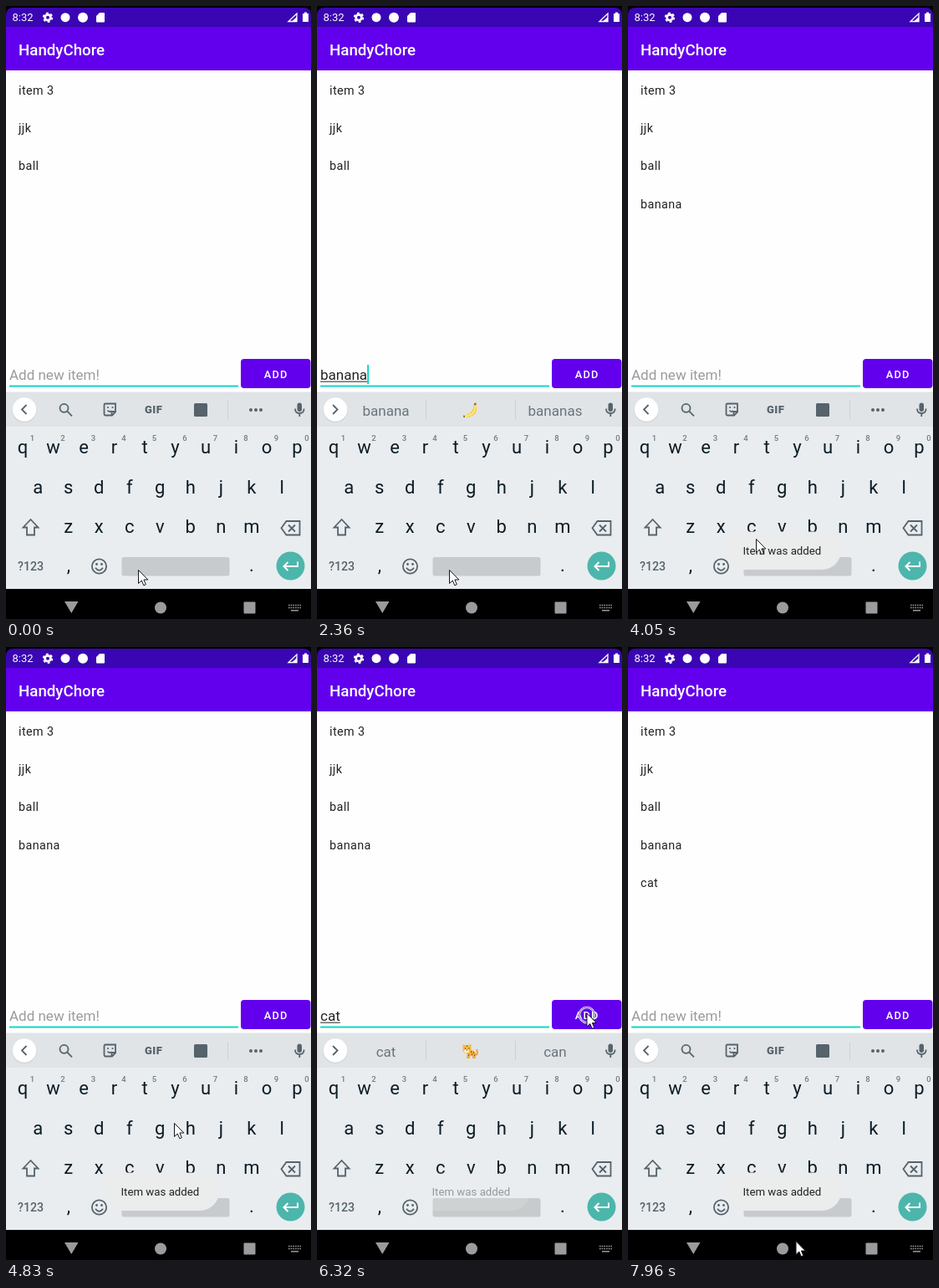
Animation, 365 px wide and 733 px high, one loop 8000 ms. Source, as an HTML page:

```html
<!DOCTYPE html>
<html lang="en">
<head>
<meta charset="utf-8">
<title>HandyChore</title>
<style>
  html, body { margin: 0; height: 100%; overflow: hidden; background: #000; }
  svg { display: block; width: 100vw; height: 100vh; font-family: Roboto, sans-serif; }
  .line { fill: none; stroke: #56636b; stroke-width: 1.8; }
  .icon { fill: #56636b; }
  .mid { text-anchor: middle; }
  #list { font-size: 14.3px; letter-spacing: .42px; fill: #222; }
  #keys { font-size: 22px; fill: #0c1c25; }
  #digits { font-size: 9.5px; font-weight: 500; fill: #727c82; }
  #suggestions { font-size: 17px; fill: #69757c; }
</style>
</head>
<body>
<svg viewBox="0 0 365 733">
  <rect width="365" height="733"/>
  <path d="M0 26V11Q0 2 9 2H356Q365 2 365 11V26Z" fill="#3a05b3"/>
  <rect y="25" width="365" height="52.5" fill="#6200ee"/>
  <rect y="77" width="365" height="385" fill="#fefefe"/>

  <g fill="#fff">
    <text x="7.5" y="18.3" font-size="13">8:32</text>
    <circle cx="50" cy="13.7" r="3.4" fill="none" stroke="#fff" stroke-width="2.8"/>
    <circle cx="50" cy="13.7" r="5.3" fill="none" stroke="#fff" stroke-width="1.8" stroke-dasharray="2.8 2.75"/>
    <circle cx="71" cy="13.7" r="5.5"/>
    <circle cx="92" cy="13.7" r="6"/>
    <path d="M112 8h5q1 0 1 1v9.500q0 1-1 1h-8q-1 0-1-1V12Z"/>
    <path d="M348 9V18.500H338Z" fill="none" stroke="#fff" stroke-width="1.3"/>
    <path d="M348 13V18.500H342Z"/>
    <path d="M357 7.500h3v1.500h2v10h-7v-10h2z"/>
    <text x="15" y="58.500" font-size="18.7" font-weight="500">HandyChore</text>
  </g>

  <g id="list"></g>

  <text id="hint" x="4" y="447" font-size="17" fill="#9b9b9b">Add new item!</text>
  <text id="typed" x="4" y="447" font-size="17" fill="#212121"></text>
  <rect id="underline" x="4" y="448.600" height="1" fill="#212121"/>
  <rect x="4" y="453.500" width="274" height="2" fill="#12d6c9"/>
  <rect id="caret" y="429" width="2" height="23" fill="#12d6c9"/>
  <rect id="button" x="281" y="422" width="83.500" height="35" rx="4"/>
  <text x="308.800" y="444.600" font-size="12.8" font-weight="500" letter-spacing="1.2" fill="#fff">ADD</text>

  <rect y="461.500" width="365" height="42" fill="#e0e4e7"/>
  <rect y="503" width="365" height="194" fill="#e9edf0"/>
  <circle cx="22" cy="483.200" r="14.8" fill="#cfd3d6"/>
  <circle cx="22" cy="482.500" r="14.3" fill="#fff"/>
  <path id="chevron" class="line" stroke-width="2"/>

  <g id="toolbar">
    <circle class="line" cx="69.500" cy="480.800" r="5"/>
    <path class="line" d="M73.300 484.600L79 490.300"/>
    <path class="line" d="M119 475.500H131V485.500L127 489.500H119Q117.500 489.500 117.500 488V477Q117.500 475.500 119 475.500ZM126.500 489V485H131M121.500 483.500Q124 486.500 126 484" stroke-width="1.6"/>
    <circle class="icon" cx="122" cy="480" r="1.100"/><circle class="icon" cx="127.500" cy="480" r="1.100"/>
    <text x="166" y="487" font-size="13" font-weight="900" letter-spacing=".5" class="icon">GIF</text>
    <rect class="icon" x="225" y="475" width="16" height="16" rx="1.500"/>
    <path d="M265.500 472V494" stroke="#cdd2d5"/>
    <circle class="icon" cx="293" cy="483" r="2"/><circle class="icon" cx="299" cy="483" r="2"/><circle class="icon" cx="305" cy="483" r="2"/>
  </g>
  <g id="suggestions" class="mid">
    <path d="M130.500 471V494M237.500 471V494" stroke="#c9ced1"/>
    <text x="82.500" y="489.500"></text>
    <text x="184" y="489.500" font-weight="700" fill="#111"></text>
    <text x="285" y="489.500"></text>
    <g id="fruit">
      <path d="M188 475L190.500 474.500L190.300 478C194 486 186 493 175.500 492L175 489.500C182 489 187 485 187.500 478Z" fill="#f8cf3d"/>
      <path d="M189 478C190.500 485 185 490 176 491" fill="none" stroke="#fff0a0" stroke-width="1.4"/>
      <path d="M188 475L190.500 474.500V477L188 477.500ZM175 489.500L177 490V492L175.500 492Z" fill="#8a7430"/>
    </g>
    <g id="feline">
      <path d="M188 488Q194 488 191 481" fill="none" stroke="#eda536" stroke-width="2"/>
      <path d="M180 482Q189 481 190 487V492H186V489H183V492H179Z" fill="#f2ae3b"/>
      <path d="M174.500 475L177 476H182L184.500 474.500V482Q183 486 179.500 486Q175 485.500 174.500 482Z" fill="#f7b947"/>
      <ellipse cx="179" cy="483" rx="3" ry="2" fill="#fff0d2"/>
      <path d="M177 480h1M181.500 480h1M179 482h1M184 484h1M187 485h1M185 487h1M188 488h1M181 488h1M179 477h1" stroke="#714718" stroke-width="1.400"/>
    </g>
  </g>
  <rect class="icon" x="348.500" y="474.500" width="5.500" height="10.500" rx="2.750"/>
  <path class="line" d="M346 481.500Q346 487 351.300 487T356.600 481.500M351.300 487V491"/>

  <g id="keys" class="mid"></g>
  <g id="digits" class="mid"></g>
  <path class="line" d="M29.500 614L20.500 623.500H25V632.500H34V623.500H38.500Z"/>
  <path class="line" d="M335.500 616H351.500V632.500H335.500L329.500 624.200ZM338 620.500L346 628.500M346 620.500L338 628.500"/>
  <text x="14" y="675" font-size="14.200" font-weight="500" class="icon">?123</text>
  <circle class="line" cx="111.500" cy="670" r="8.600"/>
  <circle class="icon" cx="108.500" cy="667.500" r="1.400"/><circle class="icon" cx="114.500" cy="667.500" r="1.400"/>
  <path class="line" d="M107 671.800Q111.500 678 116 671.800"/>
  <rect x="138.500" y="659" width="129" height="22.500" rx="2.500" fill="#c8cbcd"/>
  <circle cx="340.500" cy="669.500" r="17" fill="#4db6ac"/>
  <path d="M349 664.500V670H333M337.500 665L332.500 670L337.500 675" fill="none" stroke="#fff" stroke-width="2"/>

  <rect y="697" width="365" height="36"/>
  <g fill="#9b9b9d">
    <path d="M70 712H86.500L78.250 726Z"/>
    <circle cx="185" cy="719.500" r="7"/>
    <rect x="284.500" y="712.500" width="14" height="14" rx="1"/>
    <path d="M338 716.500H353M338 719.500H353" stroke="#9b9b9d" stroke-width="1.600" stroke-dasharray="1.600 1.100"/>
    <path d="M341 722.800H350" stroke="#9b9b9d" stroke-width="1.500"/>
  </g>

  <g id="toast">
    <rect id="pill" x="116" y="628.500" width="139" height="45.500" rx="22.700" fill="#ebecec"/>
    <text id="message" x="137.500" y="656" font-size="13.250" fill="#222">Item was added</text>
  </g>
  <g id="ring" fill="none">
    <circle cx="323" cy="440" r="9" stroke="#fff" stroke-width="2.500"/>
    <circle cx="323" cy="440" r="9" stroke="#57519a"/>
  </g>
  <path id="pointer" d="M0 0V16L3.800 12.500L6.300 18.300L8.800 17.200L6.400 11.500H11.300Z" fill="#fff" stroke="#16161e" stroke-linejoin="round"/>
</svg>
<script>
const LOOP = 8000;
const $ = id => document.getElementById(id);
const label = (x, y, s) => `<text x="${x}" y="${y}">${s}</text>`;
const show = (id, on) => $(id).setAttribute('visibility', on ? 'inherit' : 'hidden');
const set = (id, attributes) => {
  for (const name in attributes) $(id).setAttribute(name, attributes[name]);
};

const items = ['item 3', 'jjk', 'ball', 'banana', 'cat'];
$('list').innerHTML = items.map((s, i) => label(15, 106 + i * 45.2, s)).join('');
const keyRow = (chars, x, y) =>
  [...chars].map((c, i) => label(x + i * 36.5, y, c)).join('');
$('keys').innerHTML = keyRow('qwertyuiop', 20, 535) + keyRow('asdfghjkl', 38.3, 582.5) +
  keyRow('zxcvbnm', 74.8, 630) + keyRow(',', 75, 676) + keyRow('.', 294, 676);
$('digits').innerHTML = keyRow('1234567890', 31.5, 520);

// Each entry: start time, typed text, then the three suggestions.
const typing = [
  [0, ''],
  [710, 'b', 'b', 'be', 'but'],
  [850, 'ba', 'ba', 'back', 'bad'],
  [970, 'ban', 'ban', 'band', 'bank'],
  [1100, 'bana', 'bana', 'banana', 'bananas'],
  [1230, 'banan', 'banan', 'banana', 'bananas'],
  [1370, 'banana', 'banana', 'fruit', 'bananas'],
  [3360, ''],
  [5270, 'c', 'c', 'can', 'call'],
  [5420, 'ca', 'ca', 'can', 'call'],
  [5570, 'cat', 'cat', 'feline', 'can'],
  [6460, '']
];

// Each entry: start time, x, y of the pointer tip.
const moves = [
  [0, 158.5, 674.5], [2940, 230, 560], [3080, 318, 445], [3210, 322.5, 438],
  [3630, 290, 500], [3770, 215, 585], [3900, 165, 630], [4050, 153.5, 637.5],
  [4170, 190, 628], [4300, 262, 590], [4430, 250, 572], [4560, 225, 566],
  [4690, 208, 568], [4830, 201.5, 569.5], [5690, 225, 545], [5820, 275, 495],
  [5950, 325, 450], [6080, 345, 438], [6200, 323, 438], [6600, 290, 370],
  [6740, 203.5, 268.5], [6890, 190, 160], [7040, 195, 92], [7180, 205, 140],
  [7330, 205, 228], [7450, 203, 330], [7580, 201, 450], [7700, 200, 570],
  [7830, 200, 660], [7960, 201, 710.5]
];

const caretSpans = [[430, 3160], [3360, 3770], [4170, 4690], [5270, 6080], [6460, 7040], [7450, 7960]];
const toolbarSpans = [[0, 710], [3630, 5270], [6890, LOOP]];
const within = (spans, t) => spans.some(([from, to]) => t >= from && t < to);
const latest = (steps, t) => steps.findLast(step => t >= step[0]);
const slide = (t, from) => 105 * (1 - Math.min(1, Math.max(0, (t - from) / 280))) ** 2;

function drawInput(t) {
  const [, text, ...words] = latest(typing, t);
  $('typed').textContent = text;
  const width = text ? $('typed').getComputedTextLength() : 0;
  show('hint', !text);
  set('underline', { width });
  set('caret', { x: 4 + width });
  show('caret', within(caretSpans, t));

  const toolbar = within(toolbarSpans, t);
  show('toolbar', toolbar);
  set('chevron', { d: toolbar ? 'M24.500 477L19 482.500L24.500 488' : 'M19 477L24.500 482.500L19 488' });
  show('suggestions', words.length);
  const pictures = ['fruit', 'feline'];
  pictures.forEach(name => show(name, words[1] === name));
  document.querySelectorAll('#suggestions > text').forEach((el, i) => {
    el.textContent = pictures.includes(words[i]) ? '' : words[i] || '';
  });
}

function drawToast(t) {
  const [, pill, message] = latest(
    [[0, 0, 0], [3630, 1, 1], [5270, .6, .7], [5420, .2, .42], [7580, 1, 1]], t);
  const y = t < 5270 ? slide(t, 3630) : t < 7580 ? 0 : slide(t, 7580);
  set('toast', { transform: `translate(0 ${y})` });
  set('pill', { opacity: pill });
  set('message', { opacity: message });
}

function draw(t) {
  const count = t < 3500 ? 3 : t < 6600 ? 4 : 5;
  [...$('list').children].forEach((el, i) =>
    el.setAttribute('visibility', i < count ? 'visible' : 'hidden'));
  drawInput(t);
  drawToast(t);
  set('button', { fill: within([[3360, 3770], [6460, 6890]], t) ? '#6e17ee' : '#6200ee' });
  show('ring', within([[3210, 3360], [6320, 6460]], t));
  const [, x, y] = latest(moves, t);
  set('pointer', { transform: `translate(${x} ${y})` });
}

const start = performance.now();
function tick() {
  draw((performance.now() - start) % LOOP);
  requestAnimationFrame(tick);
}
tick();
</script>
</body>
</html>
```
